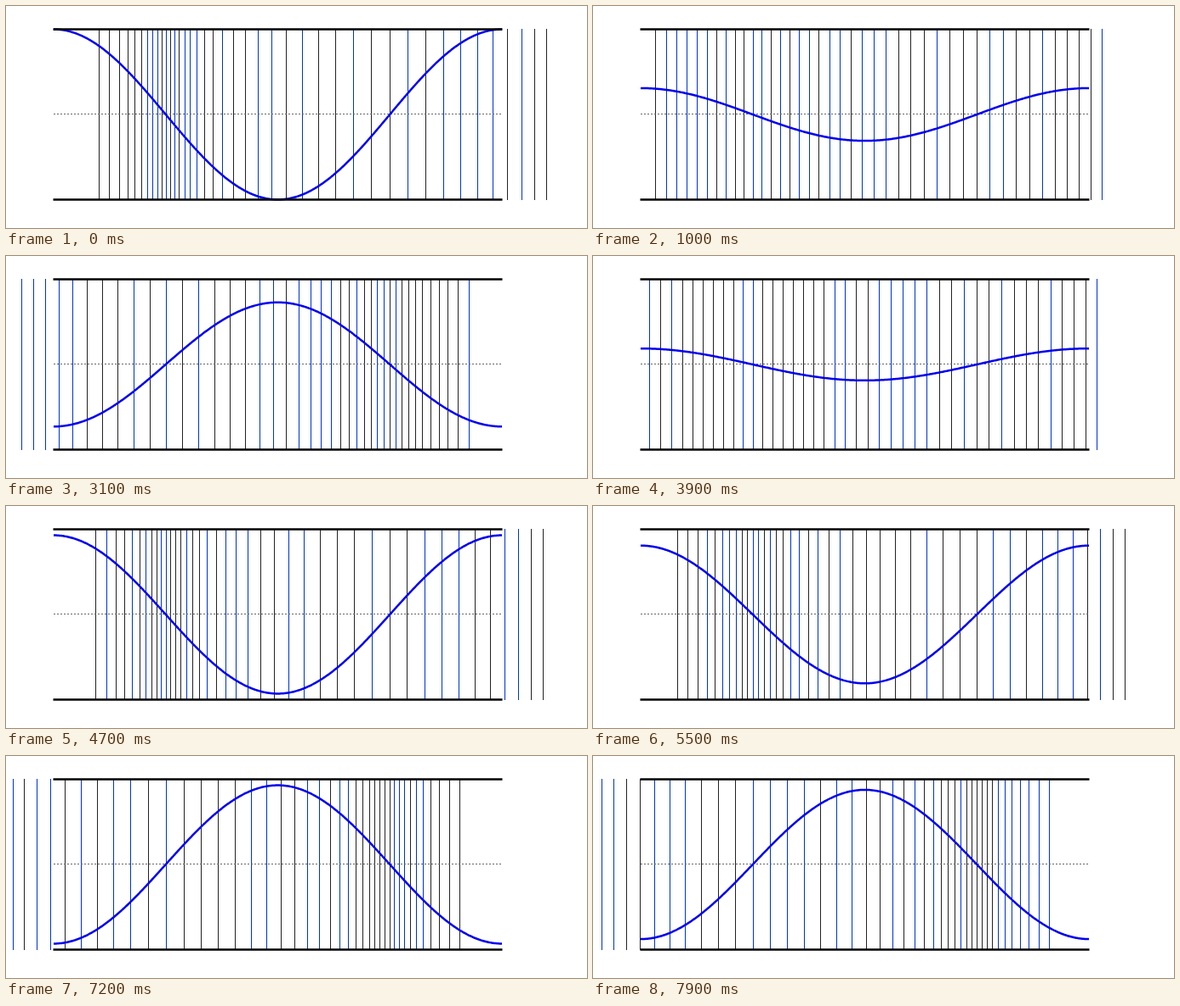
An HTML page with a canvas for the animation above (8000 ms loop, 683x262 px).

```html
<!DOCTYPE html>
<html lang="en">
<head>
<meta charset="utf-8">
<title>Standing wave</title>
<style>
  html, body { margin: 0; width: 100%; height: 100%; overflow: hidden; background: #fff; }
  canvas { display: block; }
</style>
</head>
<body>
<canvas id="stage" width="683" height="262"></canvas>
<script>
const ctx = document.getElementById('stage').getContext('2d');
const LOOP = 8000, STEP = 100, PERIOD = 5000;
const LEFT = 56, RIGHT = 583, TOP = 27.5, BOTTOM = 228.5, MID = 128;
const BARS = 40, BAR_START = 56.845, BAR_GAP = 13.1444, BAR_SWING = 52.5;

function stroke(color, width, points, dash = []) {
  ctx.strokeStyle = color;
  ctx.lineWidth = width;
  ctx.setLineDash(dash);
  ctx.beginPath();
  for (const [x, y] of points) ctx.lineTo(x, y);
  ctx.stroke();
}

function draw(time) {
  const phase = Math.cos(2 * Math.PI * time / PERIOD);
  ctx.fillStyle = '#fff';
  ctx.fillRect(0, 0, 683, 262);

  // Layers of the medium; the tint alternates with the pixel column.
  for (let i = 0; i <= BARS; i++) {
    const swing = BAR_SWING * phase * Math.cos(2 * Math.PI * i / BARS);
    const x = Math.floor(BAR_START + BAR_GAP * i + swing);
    ctx.fillStyle = x % 2 ? '#222' : '#03c';
    ctx.fillRect(x, 27, 1, 202);
  }

  stroke('#666', 1, [[LEFT, 127.5], [RIGHT, 127.5]], [2, 2]);

  const curve = [];
  for (let x = LEFT; x <= RIGHT; x++) {
    const angle = 2 * Math.PI * (x - LEFT) / (RIGHT - LEFT);
    curve.push([x, MID - (MID - TOP) * phase * Math.cos(angle)]);
  }
  stroke('#0000f0', 2.5, curve);

  for (const y of [TOP, BOTTOM]) stroke('#000', 2.5, [[55.5, y], [583.5, y]]);
}

const start = performance.now();
function tick() {
  const time = (performance.now() - start) % LOOP;
  draw(Math.floor(time / STEP) * STEP);
  requestAnimationFrame(tick);
}
tick();
</script>
</body>
</html>
```
